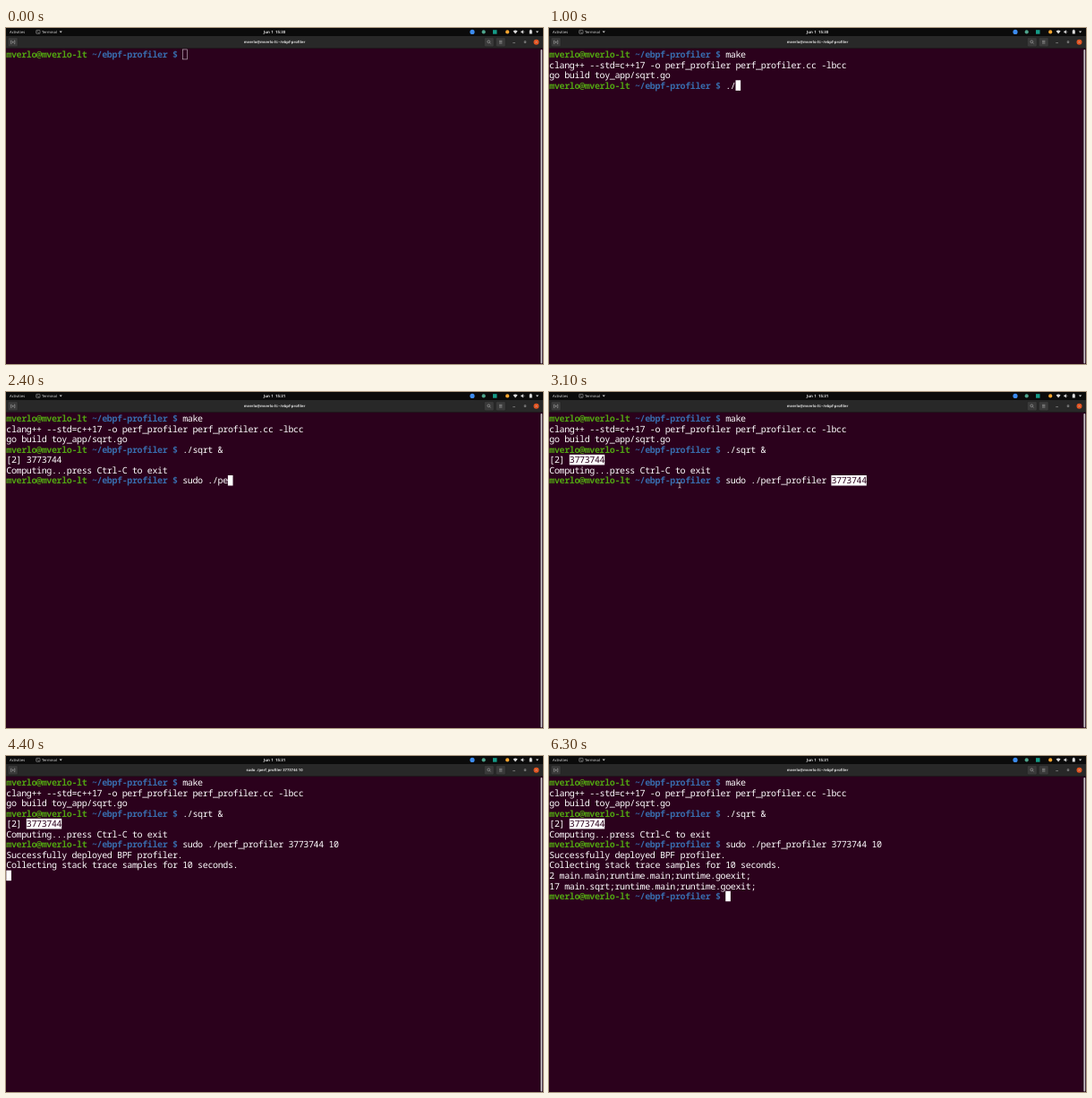
Animation of 600x375 px, one loop 6.7 s. Source, as an HTML page:

```html
<!DOCTYPE html>
<html lang="en">
<head>
<meta charset="utf-8">
<title>Terminal session</title>
<style>
  html, body { margin: 0; width: 100%; height: 100%; overflow: hidden; background: #2b011c; }
  svg { display: block; width: 600px; height: 375px; }
  text { white-space: pre; text-rendering: geometricPrecision; }
  .ui { font: 4.15px "Noto Sans", "Open Sans", sans-serif; fill: #dcdcdc; }
  .strong { font-weight: 600; text-anchor: middle; }
  #clock { font-size: 4.4px; }
  #screen { font: 10px "Noto Sans Mono", "DejaVu Sans Mono", monospace; letter-spacing: -0.373px; fill: #fff; }
  .user { font-weight: 700; fill: #51a312; }
  .path { font-weight: 700; fill: #386cac; }
  .picked { fill: #2b011c; }
  .line { fill: none; stroke: #bdbdbd; stroke-width: .5; }
</style>
</head>
<body>
<svg viewBox="0 0 600 375">
  <rect width="600" height="375" fill="#2b011c"/>
  <rect width="600" height="9" fill="#0b0b0b"/>
  <rect y="9" width="600" height="13.6" fill="#282828"/>
  <rect y="22.5" width="600" height=".6" fill="#161616"/>

  <text class="ui" x="4" y="5.9">Activities</text>
  <rect class="line" x="33.7" y="2.4" width="4.3" height="3.9" rx=".6"/>
  <path class="line" d="M34.6 3.5l.9.7l-.9.7M36 5.3h1.2"/>
  <text class="ui" x="40" y="5.9">Terminal</text>
  <path d="M59.6 3.4h3.2l-1.6 2z" fill="#d0d0d0"/>
  <text class="ui strong" id="clock" x="300" y="5.9"></text>

  <circle cx="521" cy="4.4" r="2.6" fill="#3c8cf0"/>
  <circle cx="533.7" cy="4.4" r="2.1" fill="#4fa58d"/>
  <rect x="544" y="2.2" width="4.5" height="4.5" fill="#159c88"/>
  <circle cx="560.2" cy="4.4" r="2.1" fill="#f3a530"/>
  <g fill="#ddd">
    <path d="M566.6 3.4q2.5-2 5 0l-2.5 3.2z"/>
    <path d="M575.4 3.6h1l1.5-1.4v4.4l-1.5-1.4h-1z"/>
    <rect x="584.8" y="2.4" width="3" height="4.2" rx=".4"/>
    <rect x="585.6" y="1.8" width="1.4" height="1"/>
    <path d="M592 3.4h3.2l-1.6 2z"/>
  </g>
  <path class="line" d="M578.6 3.3q.9 1.1 0 2.2"/>

  <g fill="#3a3a3a" stroke="#1c1c1c" stroke-width=".3">
    <rect x="2.3" y="10.7" width="10.8" height="10" rx="1.2"/>
    <rect x="534.4" y="10.7" width="10.6" height="10" rx="1.2"/>
    <rect x="547.4" y="10.7" width="10.6" height="10" rx="1.2"/>
  </g>
  <path class="line" d="M6.4 14H5.6v3.6h.8M9 14h.8v3.6H9M6.7 15.8h2M7.7 14.8v2"/>
  <circle class="line" cx="539.3" cy="15.3" r="1.4"/>
  <path class="line" d="M540.3 16.3l1.2 1.2M551 14.3h3.4M551 15.7h3.4M551 17.1h3.4M566.2 16.6h2.8"/>
  <rect class="line" x="579.1" y="14.9" width="1.8" height="1.8"/>
  <circle cx="592.5" cy="15.7" r="3" fill="#e2521f"/>
  <path class="line" d="M591.5 14.7l2 2M593.5 14.7l-2 2"/>
  <text class="ui strong" id="title" x="300" y="17.2"></text>

  <rect x="596.6" y="23.1" width="3.4" height="351.9" fill="#25071c"/>
  <rect x="597.4" y="24" width="1.8" height="350.4" rx=".9" fill="#c9c4c7"/>
  <g id="screen"></g>
  <path id="pointer" d="M-1.5-3Q0-3 0-2Q0-3 1.5-3M0-2V2M-1.5 3Q0 3 0 2Q0 3 1.5 3" fill="none" stroke="#ddd" stroke-width=".7"/>
</svg>

<script>
const LOOP = 6700, COL = 5.627, ROW = 11.55, LEFT = 0.3, TOP = 23.65, BASELINE = 9.4;
const USER = 'mverlo@mverlo-lt', PATH = '~/ebpf-profiler';
const PROMPT = `${USER} ${PATH} $ `;
const PID = '3773744', PROFILE = 'sudo ./perf_profiler ';
const FULL = `${PROFILE}${PID} 10`;
const $ = id => document.getElementById(id);

// Each entry holds from its time on.
const makeKeys = [[0, ''], [200, 'm'], [300, 'ma'], [400, 'mak'], [500, 'make']];
const runKeys = [[0, ''], [900, '.'], [1000, './'], [1100, './s'], [1200, './sqr'], [1300, './sqrt'], [1400, './sqrt &']];
const profileKeys = [[0, ''], [1700, 's'], [1800, 'su'], [1900, 'sud'], [2000, 'sudo'], [2100, 'sudo '],
  [2200, 'sudo ./'], [2300, 'sudo ./p'], [2400, 'sudo ./pe'], [2500, PROFILE], [3000, PROFILE + PID],
  [3200, PROFILE + PID + ' '], [3300, FULL]];
const cursorModes = [[0, 'hollow'], [100, 'solid'], [3100, 'none'], [3200, 'solid'], [3800, 'none'],
  [4400, 'solid'], [4500, 'none'], [4700, 'solid'], [5300, 'none'], [6300, 'solid']];
const titles = [[0, `${USER}:${PATH}`], [600, 'make'], [800, `${USER}:${PATH}`], [3400, FULL], [4500, `${USER}:${PATH}`]];
const pointerPath = [[2600, 88, 92], [2700, 42, 78], [2900, 58, 80], [3100, 146, 104]];

const at = (steps, t) => steps.filter(step => step[0] <= t).pop()[1];
const escape = s => s.replace(/&/g, '&amp;');

function sessionLines(t) {
  const lines = [PROMPT + at(makeKeys, t)];
  const print = (time, ...rows) => { if (t >= time) lines.push(...rows); };
  print(600, 'clang++ --std=c++17 -o perf_profiler perf_profiler.cc -lbcc');
  print(800, 'go build toy_app/sqrt.go', PROMPT + at(runKeys, t));
  print(1500, `[2] ${PID}`, 'Computing...press Ctrl-C to exit', PROMPT + at(profileKeys, t));
  print(3400, 'Successfully deployed BPF profiler.', 'Collecting stack trace samples for 10 seconds.');
  print(4500, '2 main.main;runtime.main;runtime.goexit;', '17 main.sqrt;runtime.main;runtime.goexit;', PROMPT);
  if ((t >= 600 && t < 800) || (t >= 3400 && t < 4500)) lines.push('');
  return lines;
}

function box(col, row, cols, hollow) {
  const inset = hollow ? 0.3 : 0;
  const paint = hollow ? 'fill="none" stroke="#d0c6cc" stroke-width=".6"' : 'fill="#fff"';
  return `<rect x="${LEFT + col * COL + inset}" y="${TOP + row * ROW + inset}" ` +
    `width="${cols * COL - 2 * inset}" height="${ROW - 2 * inset}" ${paint}/>`;
}

function lineMarkup(line, row, picked) {
  const span = (col, text, cls = '') =>
    `<text x="${LEFT + col * COL}" y="${TOP + BASELINE + row * ROW}" class="${cls}">${escape(text)}</text>`;
  let start = 0, out = '';
  if (line.startsWith(PROMPT)) {
    out = span(0, USER, 'user') + span(USER.length + 1, `${PATH} $`, 'path');
    start = PROMPT.length;
  }
  const pid = picked ? line.indexOf(PID) : -1;
  if (pid < 0) return out + span(start, line.slice(start));
  return out + span(start, line.slice(start, pid)) + box(pid, row, PID.length) +
    span(pid, PID, 'picked') + span(pid + PID.length, line.slice(pid + PID.length));
}

function placePointer(t) {
  const shown = t >= 2600 && t < 3200;
  $('pointer').setAttribute('visibility', shown ? 'visible' : 'hidden');
  if (!shown) return;
  const i = pointerPath.findLastIndex(p => p[0] <= t);
  const a = pointerPath[i], b = pointerPath[i + 1] || a;
  const k = b === a ? 0 : (t - a[0]) / (b[0] - a[0]);
  $('pointer').setAttribute('transform', `translate(${a[1] + (b[1] - a[1]) * k} ${a[2] + (b[2] - a[2]) * k})`);
}

function render(t) {
  const lines = sessionLines(t), last = lines.length - 1;
  const mode = at(cursorModes, t);
  const isPicked = row => (row === 4 && t >= 2700) || (row === 6 && t >= 3000 && t < 3200);
  $('screen').innerHTML = lines.map((line, row) => lineMarkup(line, row, isPicked(row))).join('') +
    (mode === 'none' ? '' : box(lines[last].length, last, 1, mode === 'hollow'));
  $('title').textContent = at(titles, t);
  $('clock').textContent = 'Jun 1  15:3' + (t < 1400 ? 0 : 1);
  placePointer(t);
}

const began = performance.now();
let shownStep = -1;
function tick() {
  const elapsed = Math.max(0, performance.now() - began) % LOOP;
  const step = Math.floor(elapsed / 100) * 100;
  if (step !== shownStep) render(shownStep = step);
  requestAnimationFrame(tick);
}
tick();
</script>
</body>
</html>
```
